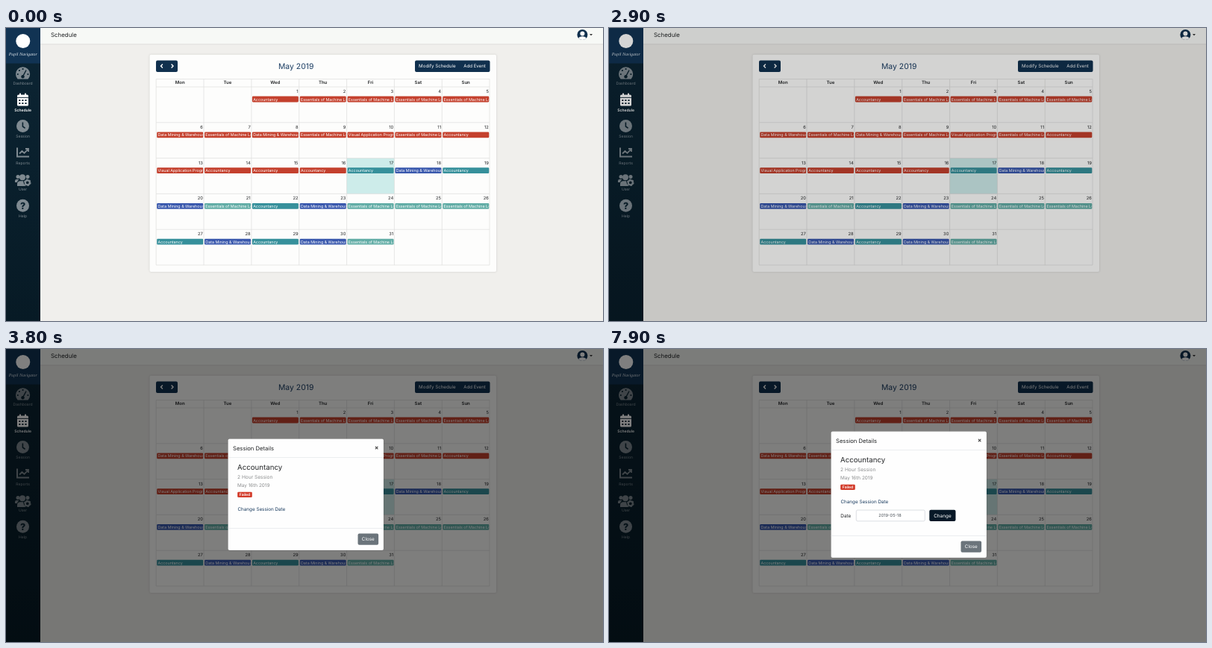
These frames come from a looping animation (800x393 px, 8 s). An HTML page:

```html
<!DOCTYPE html>
<html lang="en">
<head>
<meta charset="utf-8">
<title>Schedule</title>
<style>
  html, body { margin: 0; width: 100%; height: 100%; overflow: hidden; background: #f0efec; }
  #stage { display: block; width: 800px; height: 393px; font-family: Inter, "Open Sans", sans-serif; }
  text { text-rendering: geometricPrecision; white-space: pre; }
</style>
</head>
<body>
<svg id="stage" viewBox="0 0 800 393"></svg>
<script>
const NAVY = '#10304e', INK = '#222426', RED = '#c4402d', LOOP = 8000, TICK = 100;
const stage = document.getElementById('stage');

function el(parent, tag, attrs = {}) {
  const node = document.createElementNS('http://www.w3.org/2000/svg', tag);
  set(node, attrs);
  return parent.appendChild(node);
}
function set(node, attrs) {
  for (const key in attrs) node.setAttribute(key, attrs[key]);
}
const group = (parent, attrs) => el(parent, 'g', attrs);
const rect = (parent, x, y, width, height, fill, attrs) =>
  el(parent, 'rect', { x, y, width, height, fill, ...attrs });
const circle = (parent, cx, cy, r, fill, attrs) => el(parent, 'circle', { cx, cy, r, fill, ...attrs });
const path = (parent, d, attrs) => el(parent, 'path', { d, fill: 'none', ...attrs });
const crop = (parent, x, y, width, height) => el(parent, 'svg', { x, y, width, height, overflow: 'hidden' });

// y is the middle of the capitals
function label(parent, x, y, str, size, fill = INK, attrs = {}) {
  const node = el(parent, 'text', { x, y: y + size * 0.36, 'font-size': size, fill, ...attrs });
  node.textContent = str;
  return node;
}
const MID = { 'text-anchor': 'middle' };
const BOLD = { 'text-anchor': 'middle', 'font-weight': 600 };

function button(parent, x, y, w, h, str, size, fill) {
  const box = rect(parent, x, y, w, h, fill, { rx: 2 });
  label(parent, x + w / 2, y + h / 2, str, size, '#fff', MID);
  return box;
}

function drawSidebar() {
  const g = group(stage);
  const grad = el(el(g, 'defs'), 'linearGradient', { id: 'side', x2: 0, y2: 1 });
  el(grad, 'stop', { offset: 0, 'stop-color': '#0c2534' });
  el(grad, 'stop', { offset: 1, 'stop-color': '#071a25' });
  rect(g, 0, 0, 46, 393, 'url(#side)');
  rect(g, 0, 0, 46, 47.5, '#113353');
  circle(g, 22.8, 17.5, 9.5, '#fff');
  label(g, 22.8, 35, 'Pupil Navigator', 5.9, '#dfe6ec',
    { ...MID, 'font-family': '"Liberation Serif", serif', 'font-style': 'italic' });

  const grey = '#7f8a91', hole = '#0a212e';
  const items = [['Dashboard', 74.3], ['Schedule', 110], ['Session', 145.5],
    ['Reports', 181], ['User', 216.6], ['Help', 252.3]];
  for (const [name, y] of items) {
    const on = name === 'Schedule';
    label(g, 22.6, y, name, 5.05, on ? '#fff' : grey, on ? BOLD : MID);
  }

  // gauge
  path(g, 'M15.6 68.5A9.6 9.6 0 1 1 29.6 68.5Z', { fill: grey });
  for (const [x, y] of [[15.8, 62], [17.9, 57], [22.6, 55], [29.4, 62]]) circle(g, x, y, 1.1, hole);
  path(g, 'M22.6 64.8L26.8 57', { stroke: hole, 'stroke-width': 1.4, 'stroke-linecap': 'round' });
  circle(g, 22.5, 65.2, 2.2, hole);

  // calendar
  rect(g, 15, 89.6, 15, 15, '#fff', { rx: 1.6 });
  rect(g, 18, 87.5, 2, 4, '#fff', { rx: .5 });
  rect(g, 25, 87.5, 2, 4, '#fff', { rx: .5 });
  rect(g, 15, 92.8, 15, 1, hole);
  for (let i = 0; i < 6; i++) rect(g, 17.3 + i % 3 * 4.1, i < 3 ? 96 : 100, 2, 2, hole);

  // clock
  circle(g, 22.5, 131.5, 8.5, grey);
  path(g, 'M22.4 126.5V132L25.6 134.4', { stroke: hole, 'stroke-width': 1.6 });

  // line chart
  path(g, 'M15 160.5V172.5H31', { stroke: grey, 'stroke-width': 2 });
  path(g, 'M18 168.5L21.5 165L24.5 167.8L29.5 162.6M26 162H30V166', { stroke: grey, 'stroke-width': 1.8 });

  // people with a gear
  circle(g, 16, 199.5, 2.5, grey);
  circle(g, 22, 200.3, 4, grey);
  circle(g, 29, 199.5, 2.5, grey);
  path(g, 'M12 207V205Q12 203 14 203H17.5Q15 205 15 207ZM15 212V209Q15.5 205.3 19 205.3H23Q24 211 27 212Z', { fill: grey });
  circle(g, 28.8, 207.3, 3, 'none', { stroke: grey, 'stroke-width': 2.2 });
  circle(g, 28.8, 207.3, 4.2, 'none', { stroke: grey, 'stroke-width': 1.2, 'stroke-dasharray': '2.2 2.2' });

  // help
  circle(g, 22.5, 238.3, 8.5, grey);
  label(g, 22.5, 238.4, '?', 12.5, hole, { ...MID, 'font-weight': 800 });
}

function drawHeader() {
  rect(stage, 46, 0, 754, 22, '#f7f9f6');
  rect(stage, 46, 21.3, 754, 1, '#dedfdc');
  label(stage, 60, 9, 'Schedule', 7.9);
  circle(stage, 772.4, 9, 7, NAVY);
  circle(stage, 772.4, 7.6, 3, '#fff');
  path(stage, 'M767.2 13.7Q768 11.2 772.4 11.2T777.6 13.7A7 7 0 0 1 767.2 13.7Z', { fill: '#fff' });
  path(stage, 'M782 8H786L784 10.2Z', { fill: '#333' });
}

const COURSES = {
  a: ['Accountancy', '#36909b'],
  d: ['Data Mining & Warehousing', '#3958ad'],
  e: ['Essentials of Machine Learning', '#62ada6'],
  v: ['Visual Application Programming', RED]
};
const PLAN = 'aeeeededeveavaaaadadeadeeeadade';
const TODAY = 17;

function drawCalendar() {
  const left = 201.2, top = 79, colW = 63.84, rowH = 47.8, line = '#dfdfdd';
  rect(stage, 192.5, 35.7, 464.5, 291.3, '#fdfdfc',
    { rx: 2, style: 'filter:drop-shadow(0 .5px 1.5px rgba(0,0,0,.14))' });
  rect(stage, 201, 43.5, 29, 15.5, NAVY, { rx: 2 });
  path(stage, 'M209.9 48.6L207.5 51L209.9 53.4M221.6 48.6L224 51L221.6 53.4',
    { stroke: '#fff', 'stroke-width': 1.4 });
  label(stage, 388.7, 51, 'May 2019', 10.4, '#1b3d63', MID);
  rect(stage, 548, 43.5, 100.5, 15.5, NAVY, { rx: 2 });
  label(stage, 577.8, 51, 'Modify Schedule', 6.2, '#fff', MID);
  label(stage, 628, 51, 'Add Event', 6.1, '#fff', MID);

  rect(stage, left + 4 * colW, top + 2 * rowH, colW, rowH, '#cdecea');
  let grid = `M${left} 68.5H648M${left} 68.5V318M648 68.5V318`;
  for (let r = 0; r <= 5; r++) grid += `M${left} ${top + r * rowH}H648`;
  for (let c = 1; c < 7; c++) grid += `M${left + c * colW} 68.5V318`;
  path(stage, grid, { stroke: line, 'stroke-width': .7 });

  ['Mon', 'Tue', 'Wed', 'Thu', 'Fri', 'Sat', 'Sun'].forEach((name, c) =>
    label(stage, left + (c + .5) * colW, 73.3, name, 6, INK, BOLD));

  [...PLAN].forEach((code, i) => {
    const day = i + 1, slot = i + 2;
    const x = left + slot % 7 * colW, y = top + Math.floor(slot / 7) * rowH;
    const [name, color] = COURSES[code];
    label(stage, x + colW - 1.2, y + 6, day, 5.8, INK, { 'text-anchor': 'end' });
    rect(stage, x + 1, y + 12.6, colW - 1.8, 7.8, day < TODAY ? RED : color, { rx: 1.3 });
    label(crop(stage, x + 1, y + 12.6, colW - 2.3, 7.8), 1.3, 4, name, 5.35, '#fff');
  });
}

function drawModal() {
  const g = group(stage), m = { g };
  m.box = rect(g, 297.5, 0, 208.5, 150, '#fefefe', { rx: 2, stroke: 'rgba(0,0,0,.2)', 'stroke-width': .5 });
  label(g, 304, 12.5, 'Session Details', 7.65);
  label(g, 496.6, 11.2, '×', 8.5, '#333', BOLD);
  rect(g, 297.5, 25, 208.5, .6, '#dee2e6');
  label(g, 310, 37.6, 'Accountancy', 9.7);
  label(g, 310, 51.3, '2 Hour Session', 6.6, '#8b8d8e');
  label(g, 310, 62.3, 'May 16th 2019', 6.4, '#8b8d8e');
  rect(g, 310.2, 71.2, 19.6, 7.4, '#d33c2b', { rx: 1.4 });
  label(g, 320, 75, 'Failed', 5, '#fff', BOLD);
  m.link = label(g, 310.5, 94, 'Change Session Date', 6.3);

  m.fold = crop(g, 0, 0, 800, 0);
  label(m.fold, 310.3, 113, 'Date', 6.4);
  m.glow = rect(m.fold, 330.6, 104.9, 93, 16.2, 'none', { rx: 2.2, stroke: '#a9c4db', 'stroke-width': 1.6 });
  m.input = rect(m.fold, 331.3, 105.6, 92, 14.8, '#fff', { rx: 1.8, 'stroke-width': .7 });
  m.inner = crop(m.fold, 337, 105.6, 80, 14.8);
  m.date = label(m.inner, 0, 7.4, '', 5.65, '#495057');
  m.change = group(m.fold);
  m.changeBox = button(m.change, 429.3, 105.3, 35.2, 15.3, 'Change', 6.4, NAVY);

  m.foot = group(g);
  rect(m.foot, 297.5, -29.5, 208.5, .6, '#dee2e6');
  button(m.foot, 471.5, -22.4, 27.6, 15.3, 'Close', 6.3, '#6b747b');
  return m;
}

function drawPicker() {
  const g = group(stage), cells = {};
  path(g, 'M335.5 212L339.3 216L343 212Z', { fill: '#fff', stroke: '#bbb', 'stroke-width': .5 });
  rect(g, 331.7, 112.4, 85, 100.4, '#fff', { rx: 1.8, stroke: 'rgba(0,0,0,.22)', 'stroke-width': .6 });
  const col = i => 338.4 + i * 12;
  label(g, col(0), 121, '«', 6, INK, MID);
  label(g, 374.5, 121, 'May 2019', 5.2, INK, BOLD);
  label(g, col(6), 121, '»', 6, INK, MID);
  ['Mo', 'Tu', 'We', 'Th', 'Fr', 'Sa', 'Su'].forEach((name, i) => label(g, col(i), 133, name, 5, INK, BOLD));
  for (let i = 0; i < 42; i++) {
    const n = i - 1, x = col(i % 7), y = 145 + Math.floor(i / 7) * 11.65;
    const day = n < 1 ? n + 30 : n > 31 ? n - 31 : n;
    const box = rect(g, x - 5.7, y - 5.7, 11.4, 11.4, 'none', { rx: 1 });
    const text = label(g, x, y, day, 5.5, INK, MID);
    cells[n] = { box, text };
  }
  return { g, cells };
}

drawSidebar();
drawHeader();
drawCalendar();
const shade = rect(stage, 0, 0, 800, 393, '#000');
const modal = drawModal();
const picker = drawPicker();

// [from ms, hovered day]
const HOVERS = [[0, null], [5900, 37], [6000, 38], [6200, 31], [6400, 25], [6700, 18]];

const ramp = (t, from, to) => Math.min(1, Math.max(0, (t - from) / (to - from)));
const during = (t, from, to) => t >= from && t < to;
const show = (node, on) => { node.style.display = on ? '' : 'none'; };

function render(t) {
  shade.style.opacity = .5 * ramp(t, 2800, 3100);

  show(modal.g, t >= 3100);
  const open = .5 - Math.cos(Math.PI * ramp(t, 4300, 4900)) / 2;
  const height = 149.5 + 20 * open;
  const top = 195.2 - height / 2 - 21 * (1 - ramp(t, 3100, 3300));
  set(modal.g, { transform: `translate(0 ${top})`, opacity: ramp(t, 3100, 3260) });
  set(modal.box, { height });
  set(modal.foot, { transform: `translate(0 ${height})` });

  const linkOver = during(t, 4100, 5200);
  set(modal.link, { fill: linkOver ? '#08121c' : '#17395d', 'text-decoration': linkOver ? 'underline' : 'none' });

  const inputW = Math.max(0, 92 - 108 * (1 - open));
  const innerW = Math.max(0, inputW - 12);
  show(modal.fold, open > 0);
  set(modal.fold, { height: Math.max(0, height - 48), opacity: open });
  set(modal.input, { width: inputW });
  set(modal.inner, { width: innerW });
  set(modal.date, { x: Math.max(0, innerW / 2 - 15.8) });
  show(modal.change, open > .9);

  const focus = ramp(t, 5100, 5300) * (t < 7000 ? 1 : 0);
  set(modal.glow, { opacity: focus });
  set(modal.input, { stroke: focus > 0 ? '#4b7ca6' : '#cdd2d7' });
  const picked = t < 6700 ? 16 : 18;
  modal.date.textContent = '2019-05-' + picked;
  const press = ramp(t, 7700, 7900);
  set(modal.changeBox, { fill: `rgb(${16 - 9 * press},${48 - 24 * press},${78 - 39 * press})` });

  show(picker.g, during(t, 5300, 6900));
  const hover = HOVERS.filter(h => h[0] <= t).pop()[1];
  for (const key in picker.cells) {
    const n = +key, { box, text } = picker.cells[n];
    const active = n === picked;
    set(box, { fill: active ? NAVY : n === TODAY ? '#fbcba3' : n === hover ? '#e9e9e9' : 'none' });
    set(text, { fill: active ? '#fff' : n < 1 || n > 31 ? '#999' : INK });
  }
}

function loop() {
  const t = performance.now() % LOOP;
  render(Math.floor(t / TICK) * TICK);
  requestAnimationFrame(loop);
}
loop();
</script>
</body>
</html>
```
